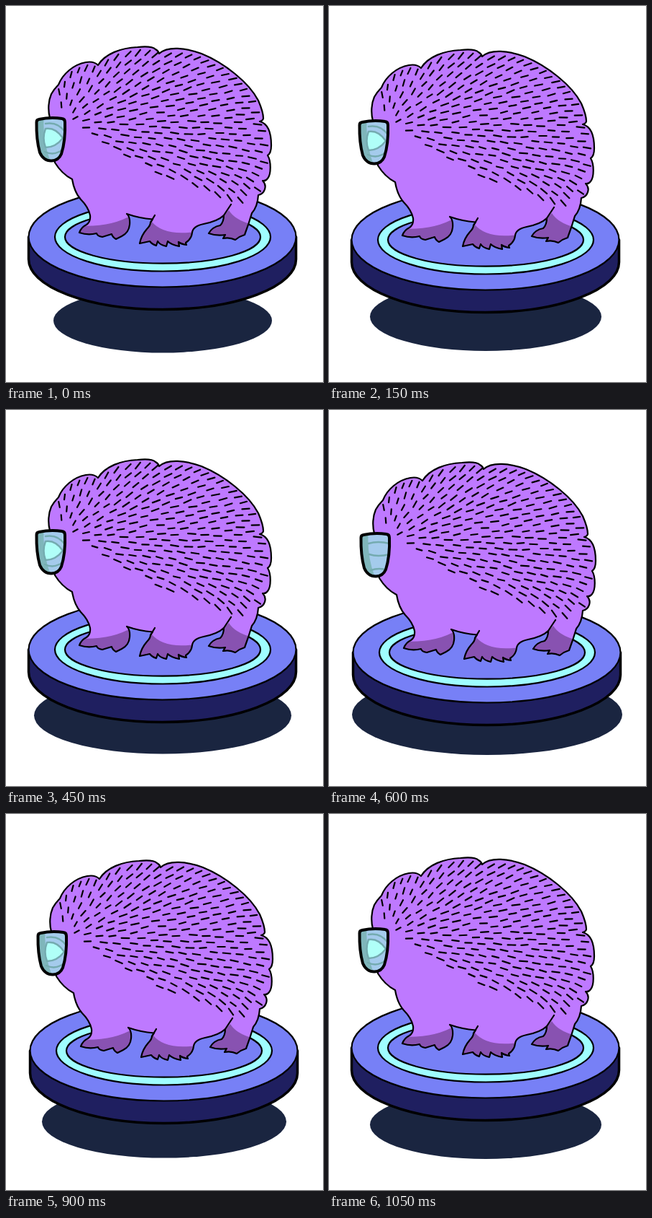
An HTML page that plays this animation: 441x521 px, repeating every 1.2 s.

```html
<!DOCTYPE html>
<html lang="en">
<head>
<meta charset="utf-8">
<style>
html, body { margin: 0; width: 100%; height: 100%; overflow: hidden; background: #fff; }
svg { display: block; width: 100%; height: 100%; }
</style>
</head>
<body>
<svg viewBox="0 0 441 521" fill="none" stroke-linejoin="round" stroke-linecap="round">
  <defs>
    <path id="body" d="M61 155C58 144 59 131 63 122Q67 115 73 109C79 94 94 81 111 78Q122 76 128 82C138 66 160 58 183 57Q203 55 208 60Q212 62 213 66C225 55 250 58 272 66C304 79 338 106 351 131Q358 147 358 156Q357 159 353 160C365 163 369 177 369 193Q369 204 364 207C369 215 369 233 364 239Q361 243 357 242C364 249 360 260 351 262Q350 278 342 287Q338 301 332 317Q325 319 319 324Q311 320 302 322L305 317Q293 319 282 315Q287 306 298 304Q303 299 303 290Q295 298 275 302Q260 305 259 314Q258 323 250 328L251 331Q244 330 240 327L241 333Q230 331 225 326L223 333Q214 331 211 326L209 332Q203 330 200 326L186 329Q188 318 196 309Q201 304 201 300L204 295.500Q185 294 168 288Q173 292 172 303Q171 314 161 319L153 323Q148 320 147 316L134 320Q127 319 126 315Q114 318 102 314Q105 306 112 303Q118 299 117 290C115 280 109 273 104 268Q95 258 92 240Q78 233 68 217Z"/>
    <clipPath id="inBody"><use href="#body"/></clipPath>
    <path id="lens" d="M46 157Q62 153.500 78 156Q82 156.500 82 161Q83 186 77 205Q73 214.500 63 214.500Q52 214.500 47 203Q42 185 42.500 161Q42.500 157.500 46 157Z"/>
    <clipPath id="inLens"><use href="#lens"/></clipPath>
  </defs>
  <ellipse id="shadow" fill="#1a2540"/>
  <g id="rider" stroke="#000" stroke-width="2.200">
    <path d="M31.500 320V351A186 69.500 0 0 0 403.500 351V320Z" fill="#1f1f60" stroke-width="3.500"/>
    <ellipse cx="217.500" cy="320" rx="186" ry="69.500" fill="#7780f6"/>
    <ellipse cx="218" cy="320" rx="150" ry="47.500" fill="#9ffdff"/>
    <ellipse cx="218" cy="320" rx="136" ry="36.700" fill="#7780f6"/>
    <use href="#body" fill="#be79ff" stroke="none"/>
    <g clip-path="url(#inBody)" fill="#8852b1" stroke="none">
      <path d="M95 304Q145 308 176 289V330H95Z"/>
      <path d="M180 302L202 298Q219 319 262 313V340H180Z"/>
      <path d="M275 306L303 290L310 283Q318 296 340 302V330H275Z"/>
    </g>
    <use href="#body"/>
    <path d="M207 290L201 300M313 275L303 290"/>
    <path id="quills"/>
    <g clip-path="url(#inLens)">
      <use href="#lens" fill="#a4cbec" stroke="none"/>
      <path d="M40 150H53Q50 185 62 216H40Z" fill="#7fb6bb" stroke="none"/>
      <g stroke="#74abb0" stroke-width="2.400">
        <g id="eye">
          <path d="M55 163Q73 160 83 176M54 202Q69 209 82 196"/>
          <path d="M55 170Q69 168 79 183Q69 196 55 196Q50 183 55 170Z" fill="#b0fff8"/>
        </g>
        <path id="lid" d="M53 169Q66 165 82 169M54 184Q66 188 82 184M56 206Q68 202 80 206"/>
      </g>
    </g>
    <use href="#lens" stroke-width="4"/>
  </g>
</svg>
<script>
const STEP = 150, STEPS = 8, DROP = 4;
const el = id => document.getElementById(id);

function set(id, attrs) {
  for (const name in attrs) el(id).setAttribute(name, attrs[name]);
}

function seeded(seed) {
  return () => (seed = seed * 16807 % 2147483647) / 2147483647;
}

// Tests for the furry back: well inside the outline and above the bare belly.
function furTest() {
  const ctx = document.createElement("canvas").getContext("2d");
  const outline = new Path2D(el("body").getAttribute("d"));
  const inBody = (x, y) => ctx.isPointInPath(outline, x, y);
  const margin = 8;
  return (x, y) => y < 135 + 175 * (1 - Math.exp((75 - x) / 170)) &&
    inBody(x - margin, y) && inBody(x + margin, y) &&
    inBody(x, y - margin) && inBody(x, y + margin);
}

// Quills fan out from the cheek and curl down towards the tail.
function slope(x, y) {
  const curl = (Math.max(0, y - 200) / 80) ** 2 * (x / 340) ** 2;
  return Math.atan2(y - 168, x - 78) + curl * 0.8;
}

// Pack quills row by row, leaving more room lengthwise than sideways.
function growQuills() {
  const random = seeded(7), inFur = furTest(), found = [];
  const jitter = size => (random() - 0.5) * size;
  let d = "";
  for (let y = 62; y < 285; y += 1.5) {
    for (let x = 68; x < 366; x += 1.5) {
      if (!inFur(x, y)) continue;
      const a = slope(x, y), c = Math.cos(a), s = Math.sin(a);
      const free = found.every(([qx, qy]) => {
        const dx = x - qx, dy = y - qy;
        return Math.hypot((dx * c + dy * s) / 18, (dy * c - dx * s) / 9.3) > 1;
      });
      if (!free) continue;
      found.push([x, y]);
      const tilt = a + jitter(0.25), half = Math.min(5, 2.7 + x / 75) + jitter(1);
      const hx = Math.cos(tilt) * half, hy = Math.sin(tilt) * half;
      d += `M${x - hx} ${y - hy}L${x + hx} ${y + hy}`;
    }
  }
  set("quills", { d });
}

// The disc sinks and rises in hard steps; the shadow grows as it sinks.
function draw(ms) {
  const step = Math.floor(ms / STEP) % STEPS;
  const low = DROP - Math.abs(DROP - step);
  const atBottom = low === DROP;
  const dx = step >= 4 && step <= 6 ? 2 : 0;
  set("shadow", {
    cx: 218 + dx,
    cy: 422 + 14 * (1 - low / DROP) ** 1.7,
    rx: 152 + 9 * low,
    ry: 44.5 + 2.9 * low
  });
  set("rider", { transform: `translate(${dx} ${low * 4})` });
  set("eye", { visibility: atBottom ? "hidden" : "visible" });
  set("lid", { visibility: atBottom ? "visible" : "hidden" });
}

growQuills();
const start = performance.now();
(function tick() {
  draw(performance.now() - start);
  requestAnimationFrame(tick);
})();
</script>
</body>
</html>
```
